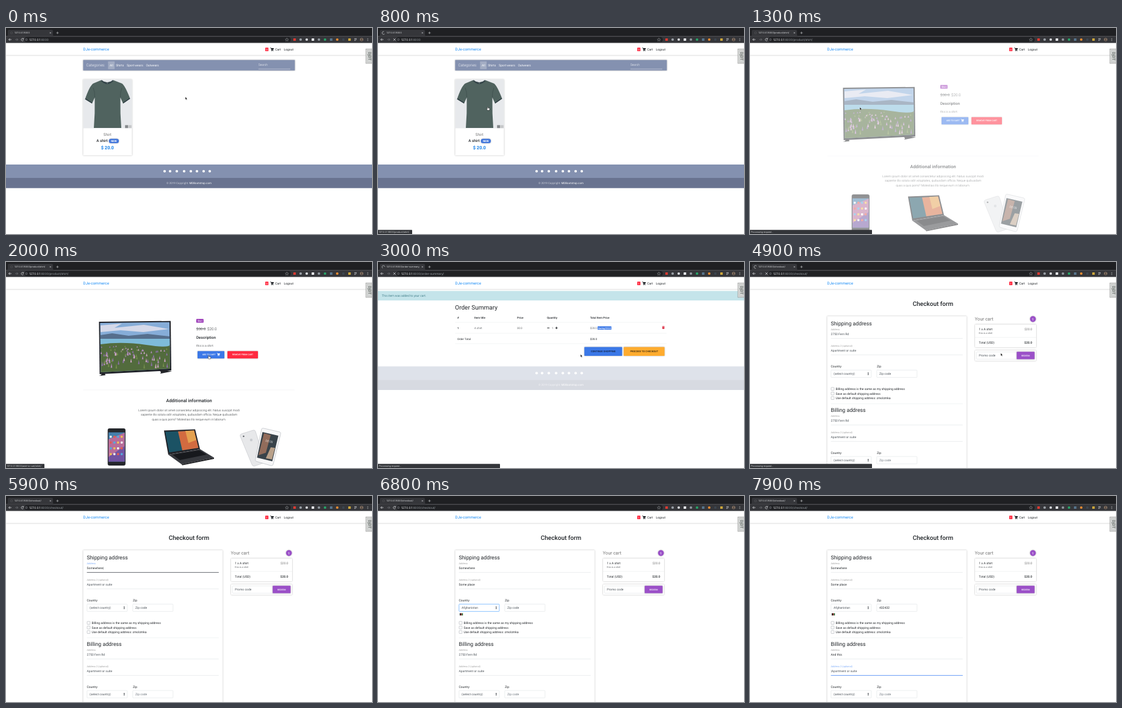
Write an HTML page that moves like this. It is 600 by 338 pixels and loops after 8 s.

```html
<!DOCTYPE html>
<html lang="en">
<head>
<meta charset="utf-8">
<title>Shop checkout</title>
<style>
  html, body { margin: 0; width: 100%; height: 100%; overflow: hidden; background: #fff; }
  svg { display: block; width: 100vw; height: 100vh; }
  text { font-family: Roboto, Arial, sans-serif; text-rendering: geometricPrecision; white-space: pre; }
  .ui { font-family: Inter, "Noto Sans", sans-serif; }
  .sh { filter: drop-shadow(0 .7px 1px rgba(0, 0, 0, .3)); }
</style>
</head>
<body>
<svg id="stage" viewBox="0 0 600 338" preserveAspectRatio="none"></svg>
<script>
const LOOP = 8000, STEP = 100, HOST = '127.0.0.1:8000';
const INK = '#212529', GREY = '#757575', BLUE = '#3b78e7', RED = '#ff2a40', PURPLE = '#9b50c8';

// Drawing helpers
const rect = (x, y, w, h, fill, more = '') => `<rect x="${x}" y="${y}" width="${w}" height="${h}" fill="${fill}" ${more}/>`;
const disc = (x, y, r, fill, more = '') => `<circle cx="${x}" cy="${y}" r="${r}" fill="${fill}" ${more}/>`;
const path = (d, fill, more = '') => `<path d="${d}" fill="${fill}" ${more}/>`;
const line = (d, stroke, width = 0.5, more = '') => path(d, 'none', `stroke="${stroke}" stroke-width="${width}" ${more}`);
const rule = (x, y, x2, color = '#dee2e6', w = 0.4, more = '') => line(`M${x} ${y}H${x2}`, color, w, more);
const text = (x, y, size, str, fill = INK, weight = 400, more = '') =>
  `<text x="${x}" y="${y}" font-size="${size}" fill="${fill}" font-weight="${weight}" ${more}>${str}</text>`;
const mid = 'text-anchor="middle"', end = 'text-anchor="end"';
const group = (id, body, more = '') => `<g id="${id}" ${more}>${body}</g>`;
const button = (x, y, w, h, fill, label, size, color = '#fff', dx = 0, id = '') =>
  rect(x, y, w, h, fill, `rx=".6" class="sh" ${id && `id="${id}"`}`) +
  text(x + w / 2 + dx, y + h / 2 + size * 0.36, size, label, color, 500, `${mid} ${id && `id="${id}Text"`}`);
const basket = (x, y, s, fill) => `<g transform="translate(${x} ${y}) scale(${s})">` +
  path('M0 0H1.3L1.6 .7H6L5.2 3.4H2.2L2.3 3.9H5V4.5H1.8L1 .6H0Z', fill) +
  disc(2.3, 5.2, 0.6, fill) + disc(4.6, 5.2, 0.6, fill) + '</g>';

function browser() {
  const icons = ['#d93a32', '#9aa0a6', '#d5d7da', '#e8eaed', '#8f979e', '#27a567', '#56748c', '#e58b32', '#3c4650', '#c9a43b'];
  return rect(0, 0, 600, 13.5, '#1f2023') +
    path('M1 13.5Q3 13 3 11V5Q3 3 5 3H75Q77 3 77 5V11Q77 13 79 13.5Z', '#35363a') +
    rect(0, 13.3, 600, 11.2, '#35363a') +
    rect(30, 14.7, 437, 8.6, '#202124', 'rx="4.3"') +
    disc(9, 8, 1.7, 'none', 'id="icon" stroke="#56585c" stroke-width=".6"') +
    line('M8 10.2A2.3 2.3 0 1 1 11.2 8', '#c8cacd', 0.7, 'id="spin"') +
    `<svg x="14" y="3" width="54" height="10">${text(0, 6.4, 3.75, '', '#dfe1e4', 400, 'class="ui" id="tab"')}</svg>` +
    line('M71.6 6.8l2.3 2.3m0-2.3l-2.3 2.3M82.4 8h4M84.4 6v4', '#d0d2d5', 0.6) +
    line('M9 19H4.5M6.5 17L4.5 19L6.5 21', '#e8eaed', 0.7) +
    line('M15 19H19.5M17.5 17L19.5 19L17.5 21', '#75787c', 0.7) +
    line('M28.7 18A2 2 0 1 0 28.8 20M28.9 16.6V18.3H27.2', '#e8eaed', 0.65, 'id="reload"') +
    line('M25.2 17.2l3.6 3.6m0-3.6l-3.6 3.6', '#e8eaed', 0.65, 'id="stop"') +
    disc(33.4, 19, 1.7, 'none', 'stroke="#9aa0a6" stroke-width=".45"') + line('M33.4 18.7V20M33.4 17.8V18.2', '#9aa0a6', 0.45) +
    `<text x="38" y="20.8" font-size="4.8" class="ui" fill="#e8eaed">127.0.0.1<tspan fill="#9aa0a6" id="url"></tspan></text>` +
    path('M460.5 16.4l.8 1.8 1.9.2-1.4 1.3.4 1.9-1.7-1-1.7 1 .4-1.9-1.4-1.3 1.9-.2Z', 'none', 'stroke="#c4c7ca" stroke-width=".4"') +
    icons.map((c, i) => i % 3 ? disc(473 + i * 10, 19, 2.1, c) : rect(471 + i * 10, 17, 4.2, 4, c, 'rx=".6"')).join('') +
    line('M571 17.4h4M571 19h4M571 20.6h2.2', '#e8eaed', 0.6) +
    disc(583, 19, 2.7, '#8c7766') + disc(583, 18.3, 1, '#393431') + path('M581.2 21Q583 18.7 584.8 21Z', '#393431') +
    [17.2, 19, 20.8].map(y => disc(593, y, 0.5, '#e8eaed')).join('');
}

function navbar() {
  return rect(0, 24.5, 600, 20, '#fff', 'class="sh"') +
    text(126.6, 37, 6.25, 'DJe-commerce', '#168af5') +
    rect(425, 32.2, 5.2, 5.8, RED, 'rx=".6"') +
    text(427.6, 36.5, 3.8, '0', '#fff', 500, `${mid} id="count"`) +
    basket(433.2, 32.3, 0.98, INK) + text(441.2, 36.6, 5, 'Cart') + text(455.5, 36.6, 5, 'Logout');
}

function handle() {
  return rect(590, 34.5, 11, 23.5, '#e4e5e4', 'stroke="#8d8f8e" stroke-width=".7"') +
    rect(592, 36.2, 9, 20, '#d3d5d4', 'stroke="#aaa" stroke-width=".4"') +
    text(0, 0, 6.6, 'DjDT', '#6f7572', 700, `${mid} transform="translate(594.2 46.3) rotate(90)"`);
}

// Footer marks are reduced to plain discs
function footer(y, id) {
  return group(id, rect(0, y, 600, 22.3, '#8491b0') + rect(0, y + 22, 600, 16.7, '#697390') +
    [260, 269, 280, 292, 303, 313, 324, 334].map(x => disc(x, y + 11, 2.1, '#fff')).join('') +
    text(300, y + 32, 4.5, '<tspan fill="#cdd1da">© 2019 Copyright: </tspan>MDBootstrap.com', '#fff', 400, mid));
}

function home() {
  return rect(126.5, 52.5, 347, 17.2, '#8491b0', 'class="sh"') +
    text(131.5, 63.4, 6.25, 'Categories:', '#fff', 300) +
    rect(167.3, 54.7, 10.8, 12.8, '#a2acc3', 'rx=".6"') +
    [[170, 'All'], [180.3, 'Shirts'], [198, 'Sport wears'], [229.4, 'Outwears']].map(([x, s]) => text(x, 62.8, 5, s, '#fff')).join('') +
    text(413.8, 62, 5, 'Search', '#fff', 300) + rule(413.8, 67.3, 466, '#fff') +
    rect(126.5, 84.5, 80, 124.6, '#fff', 'rx=".8" class="sh"') +
    rect(126.5, 84.5, 80, 80, '#e7e9ec') +
    path('M155 86Q166 92 177 86L190 91Q195 94 203.5 116L192 124L187.5 114Q187 140 189 164H144Q146 140 145.5 114L141 124L129.5 117Q137 95 143 91Z', '#50635f') +
    path('M155 86Q166 98 177 86L174.8 85.4Q166 93 157.2 85.4Z', '#35454a') +
    line('M145.5 114Q146 105 143 98M187.5 114Q187 105 190 98', '#3c4c4b', 0.7) +
    line('M130 116L141 123M203 115.5L192 123', '#2c3941', 1.2) +
    text(166, 91.2, 2, 'M', '#d9dddd', 400, mid) +
    rect(195.2, 159.4, 5, 4.8, '#85898c') + rect(200.8, 159.4, 5, 4.8, '#c6c8ca') +
    text(166.3, 176.6, 6.25, 'Shirt', GREY, 400, mid) +
    text(148.2, 186.8, 6.25, 'A shirt', INK, 500) +
    rect(168.6, 181.8, 16.4, 7.1, '#4478db', 'rx="3.5" class="sh"') + text(176.8, 186.9, 4.3, 'NEW', '#fff', 700, mid) +
    text(166.3, 198.6, 7.5, '$ 20.0', '#1680e8', 700, mid) + footer(224, 'homeFoot');
}

function television() {
  const seeded = i => Math.abs(Math.sin(i * 12.99) * 4375.85) % 1;
  let blooms = '';
  for (let i = 0; i < 95; i++) {
    const x = 156 + seeded(i) * 109, y = 139 + seeded(i + 200) * 36, h = 2 + (y - 138) / 6;
    blooms += path(`M${x} ${y - h}l1.3 ${h}h-2.6Z`, ['#b58ec1', '#8e70ae', '#d0a8c8', '#768f4d'][i % 4]);
  }
  return path('M152.4 98L270 96.7L271 178L153.5 184Z', '#202329') +
    path('M154.3 100L268 98.7L268.8 175L155.3 181Z', '#86add8') +
    path('M155 104L190 101L178 108L226 103L267 110L225 115L188 112L155 115Z', '#d5d9e9') +
    path('M154.7 120L174 117L201 121L232 118L268.3 122V128H154.8Z', '#566f8d') +
    path('M154.8 126H268.3L268.5 139L155 137Z', '#7ebbd9') +
    path('M155 135Q190 130 230 136T268.5 135L268.8 175L155.3 181Z', '#526b3d') + blooms +
    path('M158 182.5L155 186L152 187L163 185.7L162 182.5Z', '#24262a') +
    path('M252 178L254 181L253 183.2L272 179.5L264 178Z', '#24262a');
}

function gadgets() {
  const apps = [0, 1, 2, 3].map(r => [0, 1, 2, 3].map(c =>
    rect(170 + c * 6, 285 + r * 9.5, 3.4, 3.4, ['#f5f5f5', '#e35c50', '#55a9dc', '#efc055'][(r + c) % 4], 'rx=".8"')).join('')).join('');
  return rect(166.7, 273, 29.2, 61, '#25272c', 'rx="3"') + rect(168, 279.5, 26.6, 48, '#467fab') +
    path('M168 291L194.6 280V306L168 322Z', '#b76d9a') + path('M168 320L194.6 302V327.5H168Z', '#7254a2') + apps +
    path('M259 276.5L310 274.5L318 307L266 316Z', '#202126') + path('M261 278.5L308.5 276.5L315.5 305L267.5 312.5Z', '#1b5264') +
    path('M282 278L308.5 276.5L315.5 305L289 309Z', '#d26b40') + path('M294 277L308 276.5L312 292L299 297Z', '#e4a14f') +
    path('M266 316L318 307L341 321L288 332Z', '#37393e') + path('M273 316L317 309L329 316L285 325Z', '#17191d') +
    path('M288 332L341 321V323L289 333.4Z', '#17181b') +
    path('M384 286Q383 283 386 282L405 276Q408 275 409 278L424 326Q424 329 421 330L407 335Q404 335 403 332Z', '#e7e8ea', 'stroke="#bfc2c6" stroke-width=".6"') +
    disc(389.5, 286, 1.2, '#55595e') + disc(402, 292, 2.2, '#c9ccd0') +
    path('M419 274Q420 272 423 273L449 279Q451 280 450 283L438 332Q437 335 434 334L410 327Q408 326 409 323Z', '#f7f7f8', 'stroke="#b6bac0" stroke-width=".7"') +
    path('M420.5 279L446.5 285L436.5 327L411.5 321Z', '#39434a') + path('M423 281L434 284L426 313L414 317Z', '#926c5b') +
    path('M434 304L441 305L436 324L426 322Z', '#b9a18a') + text(431, 296, 5, '08:08', '#fff', 300, `${mid} transform="rotate(13 431 296)"`);
}

function product() {
  const lorem = ['Lorem ipsum dolor sit amet consectetur adipisicing elit. Natus suscipit modi',
    'sapiente illo soluta odit voluptates, quibusdam officia. Neque quibusdam', 'quas a quis porro? Molestias illo neque eum in laborum.'];
  return television() +
    rect(312, 93.5, 11.8, 6, '#9630b4', 'rx=".6"') + text(317.9, 98, 3.75, 'Shirt', '#fff', 700, mid) +
    text(312, 111.5, 6.25, '$30.0', INK, 300, 'text-decoration="line-through"') + text(330, 111.5, 6.25, '$20.0', INK, 300) +
    text(312, 126.2, 6.25, 'Description', INK, 500) + text(312, 139, 5, 'this is a shirt', INK, 300) +
    button(314, 146.2, 44, 12, BLUE, 'ADD TO CART', 3.5, '#fff', -3.4) + basket(345.7, 149.3, 0.85, '#fff') +
    button(363, 146.2, 50, 12, RED, 'REMOVE FROM CART', 3.5) +
    rule(126.5, 210, 473, '#e3e5e7') + text(300, 229.5, 7.5, 'Additional information', INK, 500, mid) +
    lorem.map((s, i) => text(300, 244.6 + i * 7.5, 5, s, INK, 300, mid)).join('') + gadgets();
}

function order() {
  const cells = [[130, '#', '1'], [158, 'Item title', 'A shirt'], [228, 'Price', '30.0'], [277, 'Quantity', ''], [347.7, 'Total Item Price', '$20.0']];
  return rect(0, 47.5, 600, 15.6, '#c4e4ea') + text(6.3, 57.2, 5, 'This item was added to your cart.', '#0c5460', 300) +
    text(126.3, 77.6, 10, 'Order Summary') +
    cells.map(([x, head, value], i) => text(x, 92.5, 4.5, head, INK, 500) + text(x, 109.7, 4.5, value, INK, i ? 300 : 500)).join('') +
    line('M277.3 108.2h3.8M290.7 108.2h3.8M292.6 106.3v3.8', INK, 1) + text(284.7, 109.7, 4.5, '1', INK, 300) +
    rect(360, 105.6, 22.6, 5.5, BLUE, 'rx=".6"') + text(371.3, 109.6, 3.5, 'Saving $10.0', '#fff', 700, mid) +
    path('M465.6 105.4h1.4l.3-.5h1l.3.5h1.4v.7h-4.4ZM465.9 106.5h3.8l-.3 3.3h-3.2Z', '#dc2f45') +
    [99, 117, 134].map(y => rule(126.5, y, 473)).join('') +
    text(130, 127.5, 4.5, 'Order Total') + text(347.7, 127.5, 4.5, '$20.0') +
    button(338.3, 139.5, 61.9, 14.5, BLUE, 'CONTINUE SHOPPING', 4.05, '#14213d') +
    button(402.8, 139.5, 66.9, 14.5, '#ffac2f', 'PROCEED TO CHECKOUT', 4.05, '#33260f', 0, 'proceed') +
    footer(171.3, 'orderFoot');
}

const field = (id, y, label) => text(132.6, y, 4, label, GREY, 300, `id="${id}Label"`) +
  text(132.6, y + 8, 5, '', '#495057', 400, `id="${id}"`) + rule(132.6, y + 13, 348.8, '#ced4da', 0.4, `id="${id}Line"`);

function places(y, pre) {
  const box = (x, id) => rect(x, y + 4.5, 66, 12, '#fff', `rx=".8" stroke="#ced4da" stroke-width=".4" id="${id}Box"`);
  return text(132.6, y, 5, 'Country') + text(208, y, 5, 'Zip') + box(132.8, pre + 'Country') + box(207.8, pre + 'Zip') +
    text(137, y + 12.4, 5, '(select country)', '#495057', 400, `id="${pre}Country"`) +
    path(`M192.6 ${y + 10}l1.2-1.9 1.2 1.9ZM192.6 ${y + 11}l1.2 1.9 1.2-1.9Z`, '#343a40') +
    text(212, y + 12.4, 5, 'Zip code', '#6c757d', 400, `id="${pre}Zip"`);
}

function checkout() {
  const checks = ['Billing address is the same as my shipping address', 'Save as default shipping address', 'Use default shipping address: zmolzmka'];
  return text(300, 72, 10, 'Checkout form', INK, 500, mid) +
    rect(126.5, 89, 228.6, 260, '#fff', 'rx=".8" class="sh"') +
    text(132.5, 103.6, 8.75, 'Shipping address') +
    field('ship1', 112.4, 'Address') + field('ship2', 139.4, 'Address 2 (optional)') + places(172.9, 'ship') +
    group('flag', rect(134, 192.3, 1.8, 3.7, '#151515') + rect(135.8, 192.3, 1.6, 3.7, '#a52c2a') + rect(137.4, 192.3, 1.8, 3.7, '#286b35')) +
    checks.map((s, i) => rect(133, 205.8 + i * 7.5, 4.8, 4.8, '#fff', 'rx=".6" stroke="#999fa5" stroke-width=".5"') + text(140.5, 210 + i * 7.5, 5, s)).join('') +
    rule(132.6, 232.7, 348.8) + text(132.5, 245.8, 8.75, 'Billing address') +
    field('bill1', 254.4, 'Address') + field('bill2', 281.4, 'Address 2 (optional)') + places(314.7, 'bill') +
    text(368.6, 96.2, 7.5, 'Your cart', GREY) +
    disc(463.8, 93.6, 4.8, PURPLE, 'class="sh"') + text(463.8, 95.6, 5.2, '1', '#fff', 500, mid) +
    rect(369, 102.6, 100, 37.3, '#fff', 'rx=".8" class="sh"') +
    text(375.3, 112.2, 5, '1 x A shirt') + text(375.3, 118.2, 4, 'this is a shirt', INK, 300) +
    text(462.6, 112.4, 5, '$20.0', GREY, 400, end) + rule(369, 123.8, 469) +
    text(375.3, 133.6, 5, 'Total (USD)') + text(462.6, 133.6, 5, '$20.0', INK, 500, end) +
    rect(369, 145, 100, 17, '#fff', 'rx=".8" class="sh"') +
    rect(371.4, 147.5, 66, 12, '#fff', 'rx=".8" stroke="#ced4da" stroke-width=".4"') + text(375.3, 155.3, 5, 'Promo code', '#495057') +
    button(437.2, 147.3, 29.3, 12.2, PURPLE, 'REDEEM', 3.5);
}

document.getElementById('stage').innerHTML = rect(0, 0, 600, 338, '#fff') +
  group('home', home()) + group('product', product()) + group('order', order()) + group('checkout', checkout()) +
  navbar() + handle() + browser() +
  group('status', rect(-1, 331.3, 201, 8, '#333539', 'rx=".8" id="statusBox"') + text(1.6, 336.4, 3.7, '', '#e1e3e5', 400, 'class="ui" id="statusText"')) +
  group('cursor',
    path('M0 0V4.6L1.1 3.6L1.9 5.3L2.7 4.9L1.9 3.3H3.3Z', '#111', 'stroke="#fff" stroke-width=".35" id="arrow"') +
    path('M-.7 -.5Q0 -1.2 .6 -.4V1.3L2.7 1.8Q3.3 2 3.1 3L2.6 5H-.5L-2 2.7Q-1.9 1.8 -.7 2.5Z', '#fff', 'stroke="#111" stroke-width=".5" id="hand"'));

const $ = Object.fromEntries([...document.querySelectorAll('[id]')].map(n => [n.id, n]));
const show = (id, on) => $[id].setAttribute('visibility', on ? 'visible' : 'hidden');
const set = (id, key, value) => $[id].setAttribute(key, value);
const write = (id, str) => { if ($[id].textContent !== str) $[id].textContent = str; };
const clamp = v => Math.max(0, Math.min(1, v));
const at = (table, t) => table.filter(row => row[0] <= t).pop();
const within = (spans, t) => spans.some(([a, b]) => t >= a && t < b);

const pages = [[0, 'home', ''], [900, 'product', '/product/shirt/'], [2800, 'order', '/order-summary/'], [4800, 'checkout', '/checkout/']];
const loading = [[800, 1100], [2500, 3400], [4600, 5500]];
const hovering = [[600, 900], [1900, 2800], [3900, 4800]];
const WAIT = 'Processing request...';
const statuses = [[0, '', 0], [600, HOST + '/product/shirt/', 56], [900, WAIT, 200], [1500, '', 0],
  [1900, HOST + '/add-to-cart/shirt/', 63], [2600, WAIT, 200], [3400, '', 0], [3900, HOST + '/checkout/', 49], [4700, WAIT, 200], [5400, '', 0]];
const moves = [[0, 294, 113], [200, 294, 113], [800, 180, 130], [1400, 180, 130], [1900, 332.6, 154], [2800, 332.6, 154],
  [3000, 332, 151.5], [3200, 332, 151.5], [3900, 439, 153], [4800, 439, 153], [5300, 170, 119], [LOOP, 170, 119]];
const focus = [[0, ''], [5400, 'ship1'], [6000, 'ship2'], [6500, 'shipCountry'], [6900, 'shipZip'], [7250, 'bill1'], [7700, 'bill2']];
// id, value, hint, typing start, typing end
const inputs = [['ship1', 'Somewhere', '1234 Elm'.replace('1234 Elm', '2750 Fern Rd'), 5500, 5900], ['ship2', 'Some place', 'Apartment or suite', 6000, 6400],
  ['shipZip', '432432', 'Zip code', 6900, 7200], ['bill1', 'And this', '2750 Fern Rd', 7300, 7600], ['bill2', '', 'Apartment or suite', LOOP, LOOP + 1]];

function moveCursor(t) {
  const i = moves.findIndex(m => m[0] > t), [t0, x0, y0] = moves[i - 1], [t1, x1, y1] = moves[i];
  const p = (t - t0) / (t1 - t0), e = p * p * (3 - 2 * p), hand = within(hovering, t);
  set('cursor', 'transform', `translate(${x0 + (x1 - x0) * e} ${y0 + (y1 - y0) * e})`);
  show('cursor', t < 5500);
  $.arrow.style.display = hand ? 'none' : '';
  $.hand.style.display = hand ? '' : 'none';
}

function fillForm(t) {
  const active = at(focus, t)[1];
  for (const [id, value, hint, from, to] of inputs) {
    const typed = value.slice(0, Math.round(value.length * clamp((t - from) / (to - from))));
    const caret = id === active;
    write(id, typed ? typed + (caret ? '|' : '') : (caret ? '|' : '') + hint);
    set(id, 'fill', typed ? INK : '#495057');
    if (id !== 'shipZip') {
      set(id + 'Label', 'fill', caret ? '#4285f4' : GREY);
      set(id + 'Line', 'stroke', !caret ? '#ced4da' : id === 'ship1' ? '#42464e' : '#4285f4');
      set(id + 'Line', 'stroke-width', caret ? 0.8 : 0.4);
    }
  }
  for (const id of ['shipCountry', 'shipZip']) {
    set(id + 'Box', 'stroke', id === active ? '#80bdff' : '#ced4da');
    set(id + 'Box', 'stroke-width', id === active ? 0.9 : 0.4);
  }
  write('shipCountry', t < 6800 ? '(select country)' : 'Afghanistan');
  show('flag', t >= 6800);
}

function draw(t) {
  const [, page, route] = at(pages, t), busy = within(loading, t), [, note, width] = at(statuses, t);
  for (const [, id] of pages) $[id].style.display = id === page ? '' : 'none';
  set('product', 'opacity', clamp((t - 950) / 700));
  set('orderFoot', 'opacity', clamp((t - 2820) / 700));
  write('tab', HOST + route);
  write('url', ':8000' + route);
  write('count', t < 2800 ? '0' : '1');
  show('reload', !busy);
  show('stop', busy);
  show('icon', !busy);
  show('spin', busy);
  set('spin', 'transform', `rotate(${t * 0.36} 9 8)`);
  show('status', note);
  set('statusBox', 'width', width + 1);
  write('statusText', note);
  const hot = t >= 3900;
  set('proceed', 'fill', hot ? '#f3a126' : '#ffac2f');
  set('proceedText', 'fill', hot ? '#fff3dc' : '#33260f');
  fillForm(t);
  moveCursor(t);
}

const start = performance.now();
function tick() {
  const t = (performance.now() - start) % LOOP;
  draw(Math.floor(t / STEP) * STEP);
  requestAnimationFrame(tick);
}
tick();
</script>
</body>
</html>
```
